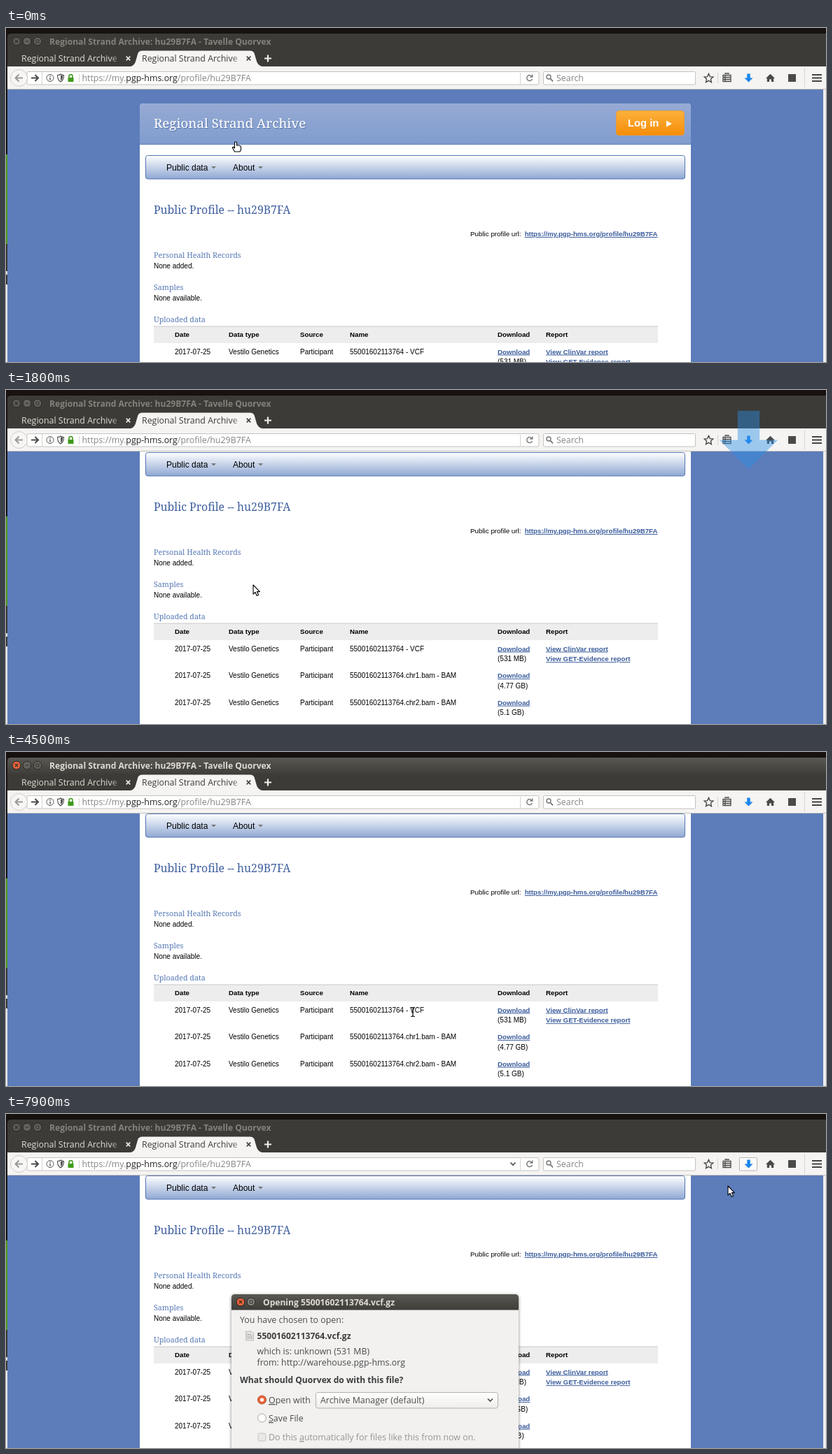
Write an HTML page that moves like this. It is 1171 px wide and 478 px high and loops after 8000 ms.

```html
<!DOCTYPE html>
<html lang="en">
<head>
<meta charset="utf-8">
<title>Browser download</title>
<style>
html, body { margin: 0; width: 100%; height: 100%; overflow: hidden; background: #15100e; }
svg { display: block; width: 1171px; height: 478px; }
text { white-space: pre; }
.ui { font: 12.4px "Open Sans", sans-serif; fill: #4c4c4c; }
.uib { font: bold 12.1px "Open Sans", sans-serif; fill: #3c3c3c; }
.serif { font-family: "Noto Serif", serif; }
.sans { font: 10px "Liberation Sans", sans-serif; fill: #000; }
.bold { font: bold 9.7px "Liberation Sans", sans-serif; fill: #000; }
.link { font: bold 9.7px "Liberation Sans", sans-serif; fill: #3a5c9c; text-decoration: underline; }
.menu { font: 12px "Liberation Sans", sans-serif; fill: #000; }
.head { font-size: 10.7px; fill: #5577b5; }
.u { text-decoration: underline; }
.line { fill: none; stroke: #4a4a4a; stroke-width: 1.6; }
</style>
</head>
<body>
<svg id="stage" viewBox="0 0 1171 478" xmlns="http://www.w3.org/2000/svg"></svg>
<script>
const LOOP = 8000, STEP = 100;
const PROJECT = 'Regional Strand Archive', PROFILE = 'hu29B7FA', BROWSER = 'Quorvex';
const SAMPLE = '55001602113764', PROFILE_URL = 'https://my.pgp-hms.org/profile/' + PROFILE;

const text = (x, y, s, cls, extra = '') => `<text x="${x}" y="${y}" class="${cls}" ${extra}>${s}</text>`;
const rect = (x, y, w, h, fill, extra = '') =>
  `<rect x="${x}" y="${y}" width="${w}" height="${h}" fill="${fill}" ${extra}/>`;
const path = (d, extra) => `<path d="${d}" ${extra}/>`;
const circle = (x, y, r, fill, extra = '') => `<circle cx="${x}" cy="${y}" r="${r}" fill="${fill}" ${extra}/>`;
const gradient = (id, from, to) => `<linearGradient id="${id}" x2="0" y2="1">
  <stop stop-color="${from}"/><stop offset="1" stop-color="${to}"/></linearGradient>`;
const fadeOut = (id, x, color) => `<linearGradient id="${id}" gradientUnits="userSpaceOnUse" x1="${x}" x2="${x + 14}">
  <stop stop-color="${color}"/><stop offset="1" stop-color="${color}" stop-opacity="0"/></linearGradient>`;
const cross = (x, y, r, color, w = 1.8) =>
  path(`M${x - r} ${y - r}l${2 * r} ${2 * r}m0 ${-2 * r}l${-2 * r} ${2 * r}`, `stroke="${color}" stroke-width="${w}"`);

const defs = `<defs>
  ${gradient('banner', '#96aad4', '#809cce')}${gradient('nav', '#ffffff', '#8fa8d3')}
  ${gradient('login', '#fcb13c', '#f68d08')}${gradient('titleOn', '#5a5852', '#3e3d39')}
  ${gradient('combo', '#ffffff', '#eeedeb')}
  ${fadeOut('fade1', 150, '#dfdbd2')}${fadeOut('fade2', 323, '#3c3b37')}
  <clipPath id="view"><rect x="2" y="88" width="1165" height="390"/></clipPath>
  <filter id="shadow"><feDropShadow dx="0" dy="1" stdDeviation="2" flood-opacity=".5"/></filter>
  <filter id="soft"><feDropShadow dx="1" dy="1" stdDeviation=".6" flood-color="#274680" flood-opacity=".55"/></filter>
</defs>`;

function tableRow(i) {
  const y = 466.5 + i * 38.6;
  const name = i ? `${SAMPLE}.chr${i}.bam - BAM` : `${SAMPLE} - <tspan id="vcf">VCF</tspan>`;
  return text(241, y, '2017-07-25', 'sans') + text(318, y, 'Vestilo Genetics', 'sans') +
    text(420, y, 'Participant', 'sans') + text(491, y, name, 'sans') +
    text(702, y, 'Download', 'link', i ? '' : 'id="download"') +
    text(702, y + 14.7, `(${['531 MB', '4.77 GB', '5.1 GB'][i]})`, 'sans');
}

const columns = { 241: 'Date', 318: 'Data type', 420: 'Source', 491: 'Name', 702: 'Download', 771: 'Report' };
const caret = x => path(`M${x} 198h7l-3.5 3.5z`, 'fill="#777"');
const page = `<g clip-path="url(#view)">${rect(2, 88, 1165, 390, '#5c7cba')}<g id="page">
  ${path('M191 700V113q0-5 5-5h777q5 0 5 5V700z', 'fill="#fff"')}
  ${path('M191 166.5V113q0-5 5-5h777q5 0 5 5v53.5z', 'fill="url(#banner)"')}
  ${rect(191, 166, 787, 1, '#6283bf')}
  ${text(211, 143, PROJECT, 'serif', 'font-size="18.8" fill="#fff" filter="url(#soft)"')}
  ${rect(871.5, 118.5, 97, 35, 'url(#login)', 'rx="4" stroke="#e79a3c"')}
  ${text(888, 141, 'Log in', '', 'font-family="Liberation Sans, sans-serif" font-weight="bold" font-size="14.8" fill="#fff"')}
  ${path('M943 132.5l8 4.5-8 4.5z', 'fill="#fff"')}
  ${rect(199.5, 182.5, 770, 33.5, 'url(#nav)', 'rx="3" stroke="#5475b2"')}
  ${text(229, 204, 'Public data', 'menu')}${caret(293)}${text(324, 204, 'About', 'menu')}${caret(360)}
  ${text(211, 266, 'Public Profile -- ' + PROFILE, 'serif', 'font-size="15.8" fill="#3f5f9e"')}
  ${text(663, 298, 'Public profile url:', 'sans', 'style="font-size:9.8px"')}
  ${text(930.5, 298, PROFILE_URL, 'link', 'text-anchor="end"')}
  ${text(211, 329, 'Personal Health Records', 'serif head')}${text(211, 344, 'None added.', 'sans')}
  ${text(211, 375, 'Samples', 'serif head')}${text(211, 390, 'None available.', 'sans')}
  ${text(211, 421, 'Uploaded data', 'serif head')}
  ${rect(211, 427, 720, 24, '#ededed')}${rect(211, 426.5, 720, 1, '#c9c9c9')}
  ${Object.entries(columns).map(([x, s]) => text(x, 442, s, 'bold')).join('')}
  ${rect(577, 457, 22, 12, '#f07746', 'id="selection"')}
  ${[0, 1, 2].map(tableRow).join('')}
  ${text(771, 466.5, 'View ClinVar report', 'link')}${text(771, 481.2, 'View GET-Evidence report', 'link')}
</g></g>`;

const desktop = rect(0, 0, 1171, 478, '#17110f') + rect(0, 181, 2, 128, '#4f9a1e') +
  rect(0, 309, 2, 58, '#3a3936') + rect(0, 348, 2, 5, '#ddd') + rect(0, 367, 2, 111, '#eceae8') +
  rect(1167, 88, 4, 390, '#efedeb');

const windowButton = (x, y, fill, extra = '') => circle(x, y, 5.8, fill, `stroke="#2c2b28" ${extra}`);
const titleBar = path('M2 88V13q0-5 5-5H1171v80z', 'fill="#3c3b37"') +
  path('M2 32V13q0-5 5-5H1171v24z', 'fill="url(#titleOn)" id="activeBar"') +
  windowButton(15, 19, '#5b5a55', 'id="close"') + cross(15, 19, 2, '#33322f', 1.3) +
  windowButton(30, 19, '#64625d') + path('M27.5 19h5', 'stroke="#33322f"') +
  windowButton(45, 19, '#64625d') + rect(43, 17, 4, 4, 'none', 'stroke="#33322f"') +
  text(62, 24, `${PROJECT}: ${PROFILE} - Tavelle ${BROWSER}`, 'uib', 'id="title"');

const tabs = text(22, 48, PROJECT, 'ui', 'style="fill:url(#fade1)"') + cross(174.5, 43.5, 2.8, '#e8e5de') +
  path('M177 55.5q7-1 9-11l2-7q1-5 7-5H348q6 0 7 5l2 7q2 10 10 11z', 'fill="#f5f4f2"') +
  `<g id="tabName">${text(194, 48, PROJECT, 'ui', 'style="fill:url(#fade2)"')}</g>
  <g id="connecting">${circle(201, 43.5, 5.5, 'none', 'id="spinner" stroke="#999" stroke-width="2.4" stroke-dasharray="2 2.3"')}
  ${text(214, 48, 'Connecting…', 'ui')}</g>` +
  cross(346.5, 43.5, 2.8, '#4a4a4a') + path('M374 38.5v10m-5-5h10', 'stroke="#f0eee9" stroke-width="2.2"');

const downArrow = 'M-3-8H3V0H8L0 8-8 0H-3z';
const toolbar = rect(2, 55, 1169, 33, '#f5f4f2') + rect(2, 87, 1169, 1, '#c2bfba') +
  rect(30, 62.5, 731, 18.5, '#fff', 'rx="2" stroke="#c6c3be"') +
  circle(18.5, 71.5, 12, '#f7f6f5', 'stroke="#cfccc8"') +
  path('M24 71.5H13.5m5-5l-5 5 5 5', 'class="line" style="stroke:#999;stroke-width:2"') +
  path('M36 71.5h10m-4.5-4.5l4.5 4.5-4.5 4.5', 'class="line" style="stroke-width:2"') +
  path('M51.5 63v18M104.5 66v12M734.5 64v16M1016.5 64v15M1140.5 57v28', 'stroke="#d6d3cf"') +
  circle(63, 71.5, 5, 'none', 'stroke="#555"') + path('M63 68v1.5m0 1.2v4', 'stroke="#555" stroke-width="1.4"') +
  path('M73.5 67.5q3 0 4.5-1.5 1.5 1.5 4.5 1.5 0 7-4.5 9.5-4.5-2.5-4.5-9.5z', 'class="line" style="stroke-width:1.1"') +
  path('M78 67.5v8q3-2 3.3-7z', 'fill="#555"') +
  rect(88.5, 71, 8, 6, '#3f9a1c') + path('M90 71v-2a2.5 2.5 0 0 1 5 0v2', 'class="line" style="stroke:#3f9a1c"') +
  text(108.5, 76, PROFILE_URL.replace('pgp-hms.org', '<tspan fill="#222">$&</tspan>'), 'ui', 'style="fill:#858585"') +
  path('M720.5 69.5l3.5 3.5 3.5-3.5', 'class="line" id="dropmarker"') +
  path('M751.2 69.5a4 4 0 1 0 .3 3.5M751.7 66.5v3.5h-3.5', 'class="line" style="stroke:#777;stroke-width:1.4"') +
  rect(767.5, 62.5, 217, 18.5, '#fff', 'rx="1" stroke="#c6c3be"') +
  circle(775, 70, 3, 'none', 'stroke="#777" stroke-width="1.4"') + path('M777.3 72.3l3.7 4', 'stroke="#777" stroke-width="1.8"') +
  text(786, 76, 'Search', 'ui', 'style="fill:#858585"') +
  path('M1003.5 65.5l1.9 4.1 4.4.5-3.3 3 .9 4.5-3.9-2.3-3.9 2.3.9-4.5-3.3-3 4.4-.5z', 'class="line" style="stroke-width:1.4"') +
  path('M1024 67.5h11v9h-11zM1027 66v-1h5v1M1024 70.5h11m-11 3h11m-8-5v8', 'class="line" style="stroke-width:1.3"') +
  rect(1047.5, 62.5, 25, 18.5, '#fbfbfa', 'id="hoverBox" rx="1" stroke="#b9b6b1"') +
  path(downArrow, 'fill="#1c86ee" transform="translate(1060.5 71.5) scale(.75)"') +
  path('M1085 72l6.5-6.3 6.5 6.3h-1.8v5h-3.2v-3.5h-3v3.5h-3.2v-5z', 'fill="#4a4a4a"') +
  rect(1117, 66, 11, 11, '#4a4a4a') +
  path('M1151 67h14m-14 4.5h14m-14 4.5h14', 'stroke="#444" stroke-width="2.2"');

const burst = path(downArrow, 'fill="#2b8fe8" id="burst"');

const dialog = `<g id="dialog" filter="url(#shadow)">
  ${rect(322, 270, 410, 220, '#f2f1f0')}
  ${path('M322 280.5V263q0-5 5-5H727q5 0 5 5v17.5z', 'fill="url(#titleOn)"')}
  ${windowButton(335, 269, '#e9623a')}${cross(335, 269, 2, '#4a2a1c', 1.3)}
  ${windowButton(350, 269, '#85827b')}${rect(348, 267, 4, 4, 'none', 'stroke="#33322f"')}
  ${text(367, 274, `Opening ${SAMPLE}.vcf.gz`, 'uib', 'style="fill:#dfdbd2"')}
  ${text(334, 299, 'You have chosen to open:', 'ui')}
  ${path('M342.5 311h8l3 3v10h-11z', 'fill="#e2e1df" stroke="#bbb"')}
  ${path('M344 315.5h6m-6 2.5h8m-8 2.5h8', 'stroke="#aaa"')}
  ${text(358.5, 322, SAMPLE + '.vcf.gz', 'uib')}
  ${text(358.5, 344, 'which is: unknown (531 MB)', 'ui')}
  ${text(358.5, 360, 'from: http://warehouse.pgp-hms.org', 'ui')}
  ${text(334, 385, `What should ${BROWSER} do with this file?`, 'uib')}
  ${circle(365.5, 409, 6, '#e9663c', 'stroke="#b5482a"')}${circle(365.5, 409, 2.6, '#fff')}
  ${text(375, 414, '<tspan class="u">O</tspan>pen with', 'ui')}
  ${rect(442.5, 398.5, 260, 22.5, 'url(#combo)', 'rx="3" stroke="#b5b1ab"')}
  ${text(449, 414, 'Archive Manager (default)', 'ui')}
  ${path('M688 407.5l3.5 3.5 3.5-3.5', 'class="line"')}
  ${circle(365.5, 435, 6, '#fff', 'stroke="#aaa6a0"')}
  ${text(375, 440, '<tspan class="u">S</tspan>ave File', 'ui')}
  ${rect(360, 457, 11, 11, '#eae8e6', 'rx="2" stroke="#c6c3bf"')}
  ${text(375, 467, 'Do this <tspan class="u">a</tspan>utomatically for files like this from now on.', 'ui', 'style="fill:#979592"')}
</g>`;

// Each pointer is drawn around its hot spot.
const pointers = `<g id="pointer" stroke-linejoin="round">
  ${path('M0 0V13.2L3 10.4 5.3 15.4 7.6 14.3 5.4 9.6H9.4z', 'id="arrow" fill="#fff" stroke="#000" stroke-width="1.1"')}
  ${path('M-1.5 1.2Q-1.5 0 0 0T1.5 1.2V5H4Q7.5 5 7.5 8V11L6 14H-1.5L-4.5 8.5Q-4.5 7-3 7.5L-1.5 9z', 'id="hand" fill="#fff" stroke="#000" stroke-width="1.1"')}
  ${path('M-3-6.5H-1.2L0-5.5 1.2-6.5H3M0-5.5V5.5M-3 6.5H-1.2L0 5.5 1.2 6.5H3M-1.5 1H1.5', 'id="beam" fill="none" stroke="#111" stroke-width="1.2"')}
</g>`;

document.getElementById('stage').innerHTML =
  defs + desktop + titleBar + tabs + toolbar + page + burst + dialog + pointers;

const moves = [
  [0, 328, 163, 'hand'], [100, 318, 166, 'hand'], [200, 345, 185, 'arrow'], [300, 367, 205, 'arrow'],
  [500, 343, 244, 'arrow'], [600, 343, 244, 'arrow'], [900, 345, 258, 'arrow'], [1000, 345, 258, 'arrow'],
  [1300, 353, 279, 'arrow'], [2400, 353, 279, 'arrow'], [2800, 355, 360, 'arrow'], [2900, 351, 371, 'beam'],
  [3400, 372, 373, 'beam'], [3500, 405, 369, 'arrow'], [3600, 475, 368, 'arrow'], [3700, 541, 371, 'beam'],
  [3900, 590, 371, 'beam'], [4100, 580, 372, 'beam'], [4500, 581, 372, 'beam'], [4600, 607, 373, 'beam'],
  [4900, 607, 373, 'beam'], [5000, 625, 371, 'arrow'], [5300, 712, 373, 'hand'], [5400, 738, 373, 'hand'],
  [5600, 733, 370, 'hand'], [6200, 733, 370, 'hand'], [6300, 745, 364, 'arrow'], [7000, 972, 130, 'arrow'],
  [7400, 1050, 84, 'arrow'], [7700, 1054, 75, 'arrow'], [7800, 1054, 75, 'arrow'], [7900, 1031, 103, 'arrow']
];
const scrolls = [[1400, 0], [1500, 13], [1600, 39.5], [1700, 72], [1800, 93], [1900, 94]];

// Linear interpolation over [time, value...] keys.
function sample(keys, t) {
  const i = Math.max(0, keys.findLastIndex(k => k[0] <= t));
  const a = keys[i], b = keys[i + 1] || a;
  const u = b === a ? 0 : Math.max(0, (t - a[0]) / (b[0] - a[0]));
  return a.slice(1).map((v, j) => typeof v === 'number' ? v + (b[j + 1] - v) * u : v);
}

const el = id => document.getElementById(id);
const show = (id, on) => { el(id).style.display = on ? '' : 'none'; };
const clamp = v => Math.min(1, Math.max(0, v));

function draw(t) {
  const [scroll] = sample(scrolls, t), [x, y, kind] = sample(moves, t);
  el('page').setAttribute('transform', `translate(0 ${-scroll})`);
  el('pointer').setAttribute('transform', `translate(${x} ${y})`);
  for (const k of ['arrow', 'hand', 'beam']) show(k, k === kind);

  const grow = clamp((t - 1230) / 800);
  const size = 5.7 * (1 - (1 - grow) ** 2);
  show('burst', t > 1230 && t < 2300);
  el('burst').setAttribute('transform', `translate(1060.5 71.5) scale(${size})`);
  el('burst').setAttribute('opacity', .78 * clamp((2300 - t) / 900));

  const focused = t >= 4500 && t < 7300;
  show('activeBar', focused);
  el('title').style.fill = focused ? '#dfdbd2' : '#85827b';
  el('close').setAttribute('fill', focused ? '#e9623a' : '#5b5a55');

  const selected = t >= 4600 && t < 6200;
  show('selection', selected);
  el('vcf').setAttribute('fill', selected ? '#fff' : '#000');
  el('download').style.fill = kind === 'hand' && t > 5000 ? '#5d86cc' : '';

  const connecting = t >= 6300 && t < 6900;
  show('connecting', connecting);
  show('tabName', !connecting);
  el('spinner').setAttribute('transform', `rotate(${t * .45} 201 43.5)`);

  show('dropmarker', t >= 7300);
  show('hoverBox', t >= 7400);
  show('dialog', t >= 7300);
  el('dialog').setAttribute('opacity', clamp((t - 7200) / 300));
}

function tick() {
  draw(Math.floor(performance.now() % LOOP / STEP) * STEP);
  requestAnimationFrame(tick);
}
tick();
</script>
</body>
</html>
```
